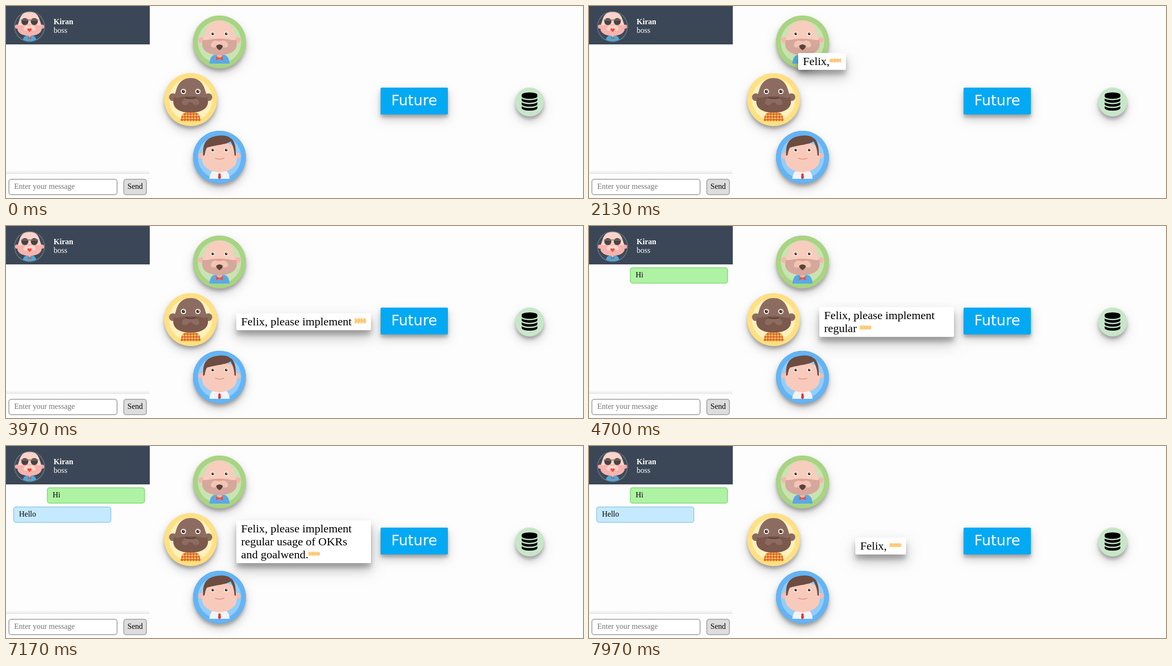
These frames come from a looping animation (1200x400 px, 8000 ms). An HTML page with a canvas:

```html
<!DOCTYPE html>
<html lang="en">
<head>
<meta charset="utf-8">
<title>Team chat</title>
<style>
html, body { margin: 0; width: 100%; height: 100%; overflow: hidden; background: #fdfdfd; }
canvas { display: block; width: 1200px; height: 400px; }
</style>
</head>
<body>
<canvas id="stage" width="1200" height="400"></canvas>
<script>
const ctx = document.getElementById('stage').getContext('2d');
const LOOP = 8000;
const PAGE = '#fdfdfd';
const SERIF = '"Liberation Serif", "Times New Roman", serif';
const SANS = '"DejaVu Sans", sans-serif';

// ---------- helpers ----------
function text(str, x, y, color, font = '16px ' + SERIF, align = 'left') {
  ctx.font = font;
  ctx.textAlign = align;
  ctx.fillStyle = color;
  ctx.fillText(str, x, y);
}

function circle(x, y, r, color) {
  ctx.fillStyle = color;
  ctx.beginPath();
  ctx.arc(x, y, r, 0, Math.PI * 2);
  ctx.fill();
}

function shape(path, color) {
  ctx.fillStyle = color;
  ctx.fill(new Path2D(path));
}

function line(path, color, width) {
  ctx.strokeStyle = color;
  ctx.lineWidth = width;
  ctx.stroke(new Path2D(path));
}

function box(x, y, w, h, r, fill, border) {
  ctx.beginPath();
  ctx.roundRect(x, y, w, h, r);
  ctx.fillStyle = fill;
  ctx.fill();
  if (border) {
    ctx.beginPath();
    ctx.roundRect(x + 1, y + 1, w - 2, h - 2, r - 1);
    ctx.strokeStyle = border;
    ctx.lineWidth = 2;
    ctx.stroke();
  }
}

// Each shadow is [opacity, drop, blur].
const LOW = [[.19, 10, 20], [.23, 6, 6]];
const HIGH = [[.25, 14, 28], [.22, 10, 10]];

function raised(shadows, draw) {
  for (const [alpha, drop, blur] of shadows) {
    ctx.save();
    ctx.shadowColor = `rgba(0,0,0,${alpha})`;
    ctx.shadowOffsetY = drop;
    ctx.shadowBlur = blur;
    draw();
    ctx.restore();
  }
}

function at(x, y, scale, draw) {
  ctx.save();
  ctx.translate(x, y);
  ctx.scale(scale, scale);
  draw();
  ctx.restore();
}

// ---------- people ----------
const HEAD = 'M0-45 C17-45 26-34 30-20 C32-12 36-6 36 4 C36 20 20 27 0 27 ' +
  'C-20 27-36 20-36 4 C-36-6-32-12-30-20 C-26-34-17-45 0-45Z';
const BEARD = 'M-35-5 C-27-2-23-6-14-6 Q0-8 14-6 C23-6 27-2 35-5 L36 4 ' +
  'C36 20 20 27 0 27 C-20 27-36 20-36 4Z';
const MUSTACHE = 'M0-3 C10-6 18 0 18 7 C17 13 7 13 4 7 Q0 4-4 7 C-7 13-17 13-18 7 C-18 0-10-6 0-3Z';
const SHIRT = 'M-21 45 Q-20 28-8 26 L8 26 Q20 28 21 45Z';
const BOW = 'M-7 30 L0 33 L7 30 L7 38 L0 35 L-7 38Z';

function ears(x, y, r, color) {
  circle(-x, y, r, color);
  circle(x, y, r, color);
}

function eyes(x, y, r) {
  for (const side of [-x, x]) {
    circle(side, y, r, '#fff6ea');
    circle(side, y, r * .6, '#3b2a24');
    circle(side + r * .2, y - r * .25, r * .18, '#fff');
  }
}

function elder() {
  ears(38, -4, 6, '#f8b4b0');
  shape(SHIRT, '#5aa9e6');
  shape('M-6 24 L6 24 L5 31 L0 34 L-5 31Z', '#eab5a4');
  shape(HEAD, '#f7cdbd');
  shape(BEARD, '#d6a79b');
  shape(MUSTACHE, '#f0c5b6');
  line('M-11-5 Q0-1 11-5', '#ee9a8a', 2);
  shape('M-7 8 Q0 2 7 8 Q6 14 0 17 Q-6 14-7 8Z', '#5d4037');
  eyes(14, -17, 4.5);
  shape(BOW, '#f0503c');
}

function plaidMan() {
  ears(37, -5, 8, '#8a6b60');
  shape(SHIRT, '#ffbb4d');
  ctx.save();
  ctx.clip(new Path2D(SHIRT));
  for (let i = -18; i <= 18; i += 6) line(`M${i} 24 V46`, '#cf4a2c', 1.3);
  for (let y = 30; y <= 45; y += 6) line(`M-22 ${y} H22`, '#cf4a2c', 1.3);
  ctx.restore();
  shape(HEAD, '#8c6c61');
  shape(BEARD, '#7b594d');
  shape(MUSTACHE, '#8c6c61');
  line('M-11-4 Q0-1 11-4', '#5d4037', 2.5);
  eyes(15, -17, 5.5);
}

function clerk() {
  ears(38, -3, 6, '#f8bcae');
  shape(SHIRT, '#f3f3f6');
  shape('M-6 24 L6 24 L0 33Z', '#e9b3a2');
  shape('M-34-18 Q0-40 33-22 C36-4 38 2 34 14 C25 29 9 31 0 31 C-9 31-25 29-34 14 C-38 2-36-10-34-18Z', '#f8cabb');
  shape('M-34-3 C-35-22-32-38-12-43 C2-47 18-45 22-40 C31-37 35-20 34-3 L31-4 ' +
    'C31-14 29-22 23-33 C14-26-6-26-26-20 C-29-16-30-10-31-4Z', '#6d4c41');
  line('M-9 2 Q0 6 10 2', '#e08c78', 1.5);
  eyes(14, -15, 4.5);
  shape('M-2 34 L2 34 L3 43 L0 46 L-3 43Z', '#d83a34');
}

function boss() {
  ears(38, 0, 6, '#f8a9ad');
  shape(SHIRT, '#4fa8d8');
  shape('M-6 24 L6 24 L0 32Z', '#eab0a4');
  shape(HEAD, '#fad3ca');
  shape(BEARD, '#f6b3ae');
  shape(MUSTACHE, '#fbd5cc');
  shape('M0 7 C3 3 8 6 6 10 L0 16 L-6 10 C-8 6-3 3 0 7Z', '#f4483a');
  for (const x of [-14, 14]) circle(x, -15, 10.5, '#4a4340');
  line('M-26-20 H26', '#857a70', 2.5);
  shape('M-5 30 L0 33 L5 30 L5 37 L0 35 L-5 37Z', '#d9503f');
}

const TEAM = [
  { x: 444, y: 75, ring: '#a9d483', inner: '#c9e3b2', draw: elder },
  { x: 384, y: 195, ring: '#ffe083', inner: '#fff0bd', draw: plaidMan },
  { x: 444, y: 315, ring: '#64b4f5', inner: '#93cdf9', draw: clerk }
];

function team() {
  for (const p of TEAM) {
    raised(LOW, () => circle(p.x, p.y, 55, p.ring));
    circle(p.x, p.y, 45, p.inner);
    at(p.x, p.y, 1, p.draw);
  }
}

// ---------- chat panel ----------
const HI_AT = 4000, DOTS_AT = 5400, HELLO_AT = 6900;

function chat(t) {
  ctx.fillStyle = '#3b4756';
  ctx.fillRect(0, 0, 299, 80);
  circle(49, 43, 32, '#72797f');
  circle(49, 43, 30.5, '#3f4a58');
  ctx.save();
  ctx.beginPath();
  ctx.arc(49, 43, 30.5, 0, Math.PI * 2);
  ctx.clip();
  at(49, 43, .7, boss);
  ctx.restore();
  text('Kiran', 99, 38, '#fff', 'bold 16px ' + SERIF);
  text('boss', 99, 56, '#fff');

  if (t >= HI_AT) {
    box(85, 86, 204, 34, 6, '#aef3a3', '#8fdf85');
    text('Hi', 97, 107, '#000');
  }
  if (t >= HELLO_AT) {
    box(15, 126, 204, 34, 6, '#c5e9fd', '#9fd2ef');
    text('Hello', 27, 147, '#000');
  } else if (t >= DOTS_AT) {
    box(15, 126, 204, 34, 6, '#f1f1f1', '#dadada');
    for (let i = 0; i < 3; i++) {
      const pulse = Math.cos((t - 6020) / 1000 * Math.PI * 2 - (i - 1) * 2);
      circle(31.5 + i * 7.6, 142, 2, `rgba(0,0,0,${.6 + .35 * pulse})`);
    }
  }

  const edge = ctx.createLinearGradient(0, 342, 0, 350);
  edge.addColorStop(0, 'rgba(0,0,0,0)');
  edge.addColorStop(1, 'rgba(0,0,0,.09)');
  ctx.fillStyle = edge;
  ctx.fillRect(0, 342, 298, 8);
  box(5, 360, 227, 34, 6, '#fff', '#adadad');
  text('Enter your message', 17, 381, '#757575');
  box(244, 360, 49, 34, 6, '#dddddd', '#acacac');
  text('Send', 268.5, 381, '#000', undefined, 'center');
}

// ---------- right side ----------
function future() {
  raised(LOW, () => box(779, 170, 140, 56, 3, '#04a9f4'));
  text('Future', 849, 207, '#fff', '30px ' + SANS, 'center');
}

function database() {
  raised(LOW, () => circle(1089, 200, 30, '#c8e6c9'));
  at(1072.5, 180, 38 / 1792, () => {
    shape('M0 256 A768 256 0 0 1 1536 256 V384 A768 256 0 0 1 0 384Z', '#000');
    for (const y of [598, 982, 1366]) {
      shape(`M0 ${y} q119 84 325 127 t443 43 t443-43 t325-127 v170 A768 256 0 0 1 0 ${y + 170}Z`, '#000');
    }
  });
}

// ---------- spoken bubble ----------
const TOKENS = 'Felix, please implement regular usage of OKRs and goalwend.'.split(/( )/);
const TIMES = [0, 240, 900, 1200, 1500, 1750, 2200, 2500, 2700, 2850,
  2980, 3080, 3250, 3480, 3660, 3950, 4500];
const SPEECHES = [
  { from: TEAM[0], start: 2115, end: 7490 },
  { from: TEAM[2], start: 7605, end: LOOP }
];
const REST = { x: 619, y: 199.5 }, FLIGHT = 400;
const MAX_LINE = 260, LINE = 27, WAVE = 24;

function wrap(tokens) {
  const lines = [''];
  for (const token of tokens) {
    const last = lines.length - 1;
    if (token !== ' ' && ctx.measureText(lines[last] + token).width > MAX_LINE) lines.push(token);
    else lines[last] += token;
  }
  return lines;
}

function soundWave(x, y, t) {
  const swell = .7 - .3 * Math.cos((t - 2130) / 413 * Math.PI);
  for (let i = 0; i < 12; i++) {
    const beat = Math.abs(Math.sin(i * 2.1 + t / 130));
    const h = 3 + 14 * swell * (.25 + .75 * beat);
    ctx.fillStyle = i % 3 ? '#ffb74d' : '#ffc670';
    ctx.fillRect(x + i * 2, y - h / 2, 1.6, h);
  }
}

function bubble({ from, start }, t) {
  const age = t - start;
  const p = Math.min(1, .2 + .8 * age / FLIGHT);
  const x0 = from.x, y0 = from.y + 15;
  const cx = x0 + (REST.x - x0) * p, cy = y0 + (REST.y - y0) * p;

  ctx.font = '24px ' + SERIF;
  const lines = wrap(TOKENS.filter((_, i) => age >= TIMES[i]));
  const tail = ctx.measureText(lines[lines.length - 1]).width;
  const w = lines.length > 1 ? MAX_LINE + 20 : Math.min(MAX_LINE, tail + WAVE) + 20;
  const h = lines.length * LINE + 8;
  const x = Math.round(cx - w / 2), y = Math.round(cy - h / 2);

  raised(HIGH, () => box(x, y, w, h, 3, '#fff'));
  lines.forEach((s, i) => text(s, x + 10, y + 25 + i * LINE, '#000', '24px ' + SERIF));
  soundWave(x + 10 + tail, y + 15.5 + (lines.length - 1) * LINE, t);
}

function render(t) {
  ctx.fillStyle = PAGE;
  ctx.fillRect(0, 0, 1200, 400);
  chat(t);
  team();
  future();
  database();
  for (const s of SPEECHES) if (t >= s.start && t < s.end) bubble(s, t);
}

const began = performance.now();
function tick() {
  render((performance.now() - began) % LOOP);
  requestAnimationFrame(tick);
}
tick();
</script>
</body>
</html>
```
